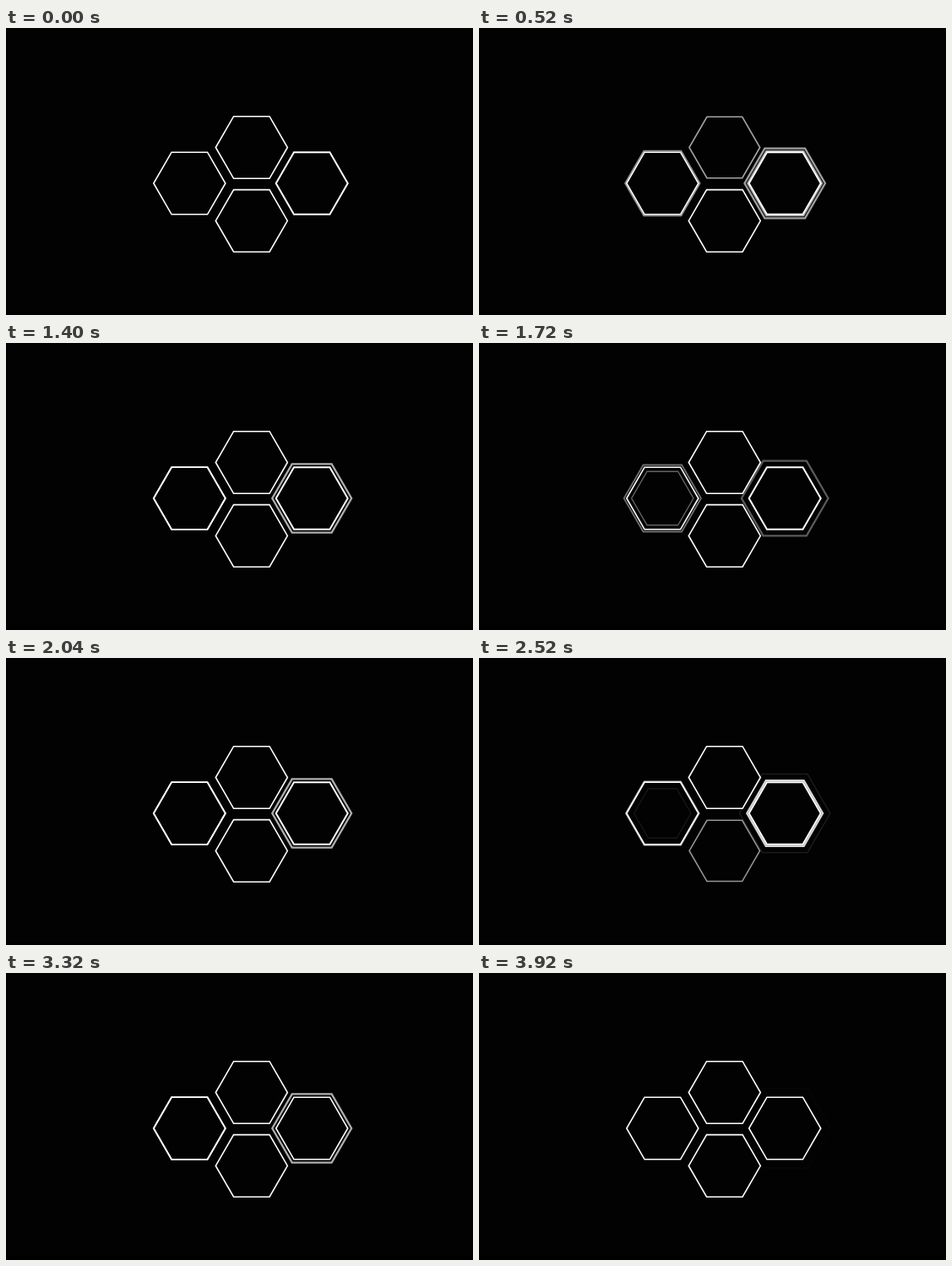
These frames come from a looping animation (553 by 340 pixels, 4000 ms). An HTML page with a canvas:

```html
<!DOCTYPE html>
<html lang="en">
<head>
<meta charset="utf-8">
<title>Honeycomb loop</title>
<style>
  html, body { margin: 0; width: 100%; height: 100%; overflow: hidden; background: #020202; }
  canvas { display: block; }
</style>
</head>
<body>
<canvas id="stage" width="553" height="340"></canvas>
<script>
const ctx = document.getElementById('stage').getContext('2d');
const LOOP = 4000, STEP = 40, LAST = 3920;
const RADIUS = 42.5, LINE = 1.6;
const TOP = [290.8, 141.5], LEFT = [217.3, 184], RIGHT = [362.2, 184], BOTTOM = [290.8, 228.4];

const rightStarts = [180, 480, 1120, 1760, 2400, 3040];
const leftStarts = [200, 840, 1480, 2120, 2760];
const ENTER = 560, LEAVE = 520, OUTWARD = 900;

function hexagon([x, y], radius, alpha = 1, width = LINE) {
  if (alpha <= 0) return;
  ctx.beginPath();
  for (let i = 0; i < 6; i++) {
    const a = i * Math.PI / 3;
    ctx.lineTo(x + radius * Math.cos(a), y + radius * Math.sin(a));
  }
  ctx.closePath();
  ctx.lineWidth = width;
  ctx.strokeStyle = `rgba(255,255,255,${alpha})`;
  ctx.stroke();
}

// A short dip in size and brightness.
function blink(center, time, start, depth) {
  const p = (time - start) / 240;
  const dip = p > 0 && p < 1 ? Math.sin(Math.PI * p) ** 2 : 0;
  hexagon(center, RADIUS - dip * depth * 1.8, 1 - dip * depth);
}

// Rings that grow away from the right cell and fade.
function rightRing(age) {
  if (age <= 0 || age >= OUTWARD) return;
  const radius = Math.min(54.2, 43.5 + 0.0115 * age + 2.5e-6 * age * age);
  const alpha = Math.min(age / 60, 1) * 0.95 * (1 - age / OUTWARD) ** 0.9;
  hexagon(RIGHT, radius, alpha * (age > 700 ? 0.55 : 1), age > 600 ? 1.5 : 2.3);
}

// Rings that settle on the left cell, then shrink out of it.
function leftRing(age) {
  if (age <= 0) return;
  if (age <= ENTER) {
    const p = age / ENTER;
    hexagon(LEFT, RADIUS + 9.5 * (1 - p) ** 2, p, 1.8);
  } else if (age < ENTER + LEAVE) {
    const p = (age - ENTER) / LEAVE;
    hexagon(LEFT, RADIUS - 9.5 * p, 1 - p, 1.4);
  }
}

function draw(time) {
  ctx.fillStyle = '#020202';
  ctx.fillRect(0, 0, 553, 336);
  ctx.fillStyle = '#000';
  ctx.fillRect(0, 336, 553, 4);

  hexagon(LEFT, RADIUS);
  hexagon(RIGHT, RADIUS, 1, time < 3040 ? 2 : LINE);
  blink(TOP, time, 400, 0.36);
  blink(BOTTOM, time, 2400, 0.42);
  for (const start of rightStarts) rightRing(time - start);
  for (const start of leftStarts) leftRing(time - start);
}

function frame() {
  const time = performance.now() % LOOP;
  draw(Math.min(LAST, Math.floor(time / STEP) * STEP));
  requestAnimationFrame(frame);
}
frame();
</script>
</body>
</html>
```
